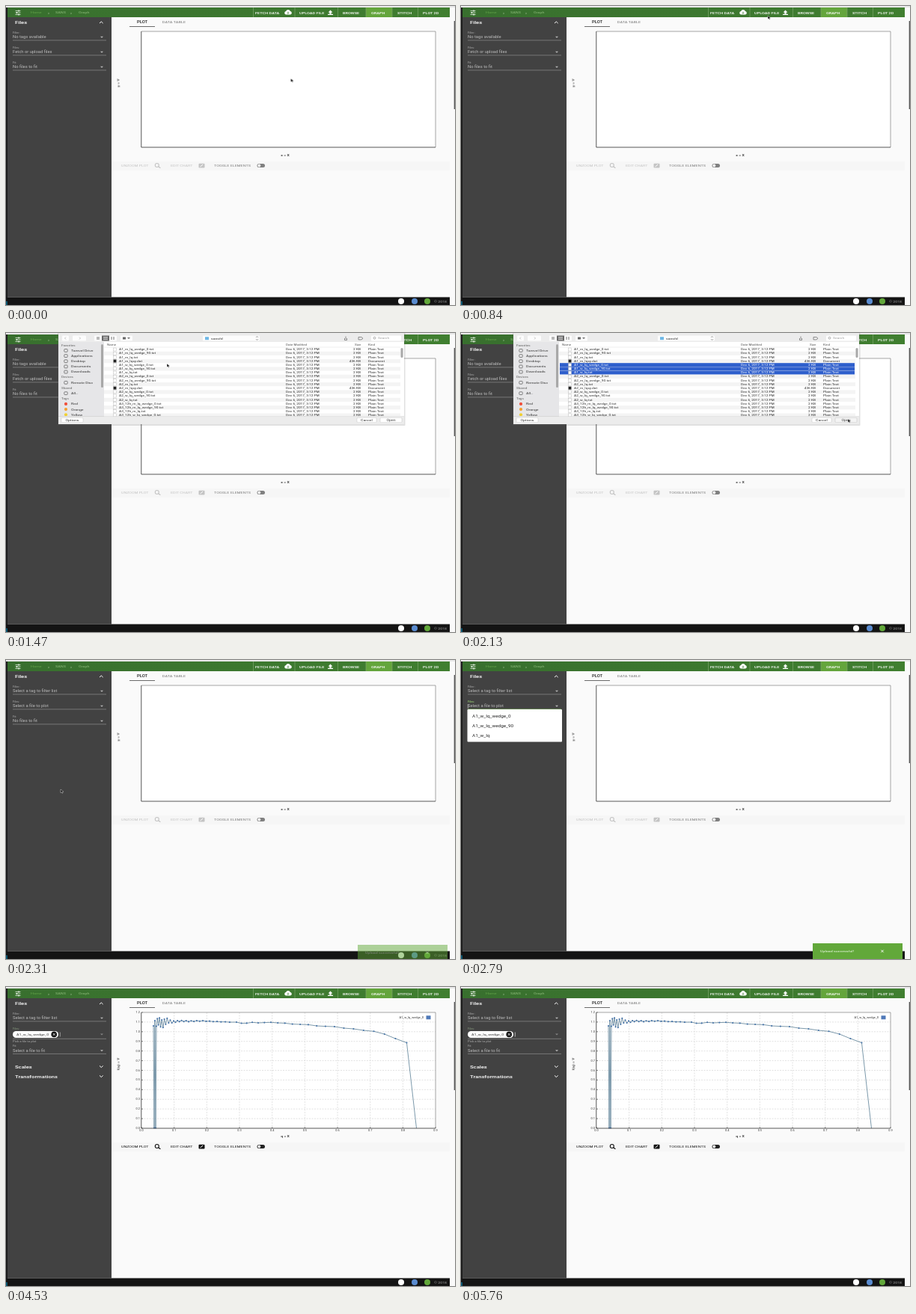
Write an HTML page that moves like this. It is 600 px wide and 400 px high and loops after 5.79 s.

```html
<!DOCTYPE html>
<html lang="en">
<head>
<meta charset="utf-8">
<title>Upload and plot</title>
<style>
html, body { margin: 0; width: 100%; height: 100%; overflow: hidden; background: #fafafa; }
svg { display: block; width: 600px; height: 400px; font-family: Roboto, "Open Sans", sans-serif; }

.empty, .loaded, .idle, .done, .hover, .files, .pick1, .pick3, .press, .focus, .menu, .item {
  animation: 5790ms step-end infinite;
}
.empty { animation-name: empty; }
.loaded { animation-name: loaded; }
.idle { animation-name: idle; }
.done { animation-name: done; }
.hover { animation-name: hover; }
.files { animation-name: files; }
.pick1 { animation-name: pick1; }
.pick3 { animation-name: pick3; }
.press { animation-name: press; }
.focus { animation-name: focus; }
.menu { animation-name: menu; }
.item { animation-name: item; }
.sheet { animation: sheet 5790ms linear infinite; }
.base { animation: base 5790ms linear infinite; }
.toast { animation: toast 5790ms linear infinite; }
.caret { animation: caret 5790ms linear infinite; }
.arrow { animation: move 5790ms ease-in-out infinite, arrow 5790ms step-end infinite; }

@keyframes empty { 0% { opacity: 1 } 38.86%, 100% { opacity: 0 } }
@keyframes loaded { 0% { opacity: 0 } 38.86% { opacity: 1 } 55.96%, 100% { opacity: 0 } }
@keyframes idle { 0% { opacity: 1 } 55.96%, 100% { opacity: 0 } }
@keyframes done { 0% { opacity: 0 } 55.96%, 100% { opacity: 1 } }
@keyframes hover { 0% { opacity: 0 } 7.77% { opacity: .08 } 10.88% { opacity: .18 } 11.4% { opacity: .08 } 14.51%, 100% { opacity: 0 } }
@keyframes files { 0% { opacity: 0 } 21.5%, 100% { opacity: 1 } }
@keyframes pick1 { 0% { opacity: 0 } 25.9%, 100% { opacity: 1 } }
@keyframes pick3 { 0% { opacity: 0 } 29.02%, 100% { opacity: 1 } }
@keyframes press { 0% { opacity: 0 } 35.23%, 100% { opacity: .06 } }
@keyframes focus { 0% { opacity: 0 } 45.6% { opacity: 1 } 55.96%, 100% { opacity: 0 } }
@keyframes menu { 0% { opacity: 0 } 46.11% { opacity: 1 } 55.96%, 100% { opacity: 0 } }
@keyframes item { 0% { opacity: 0 } 50.8%, 100% { opacity: .08 } }
@keyframes sheet {
  0%, 14.51% { transform: translateY(-126px); animation-timing-function: ease-in-out }
  21.5%, 37.13% { transform: none; animation-timing-function: ease-in-out }
  38.86%, 100% { transform: translateY(-126px) }
}
@keyframes base { 0%, 14.51% { opacity: .5 } 19.17% { opacity: .8 } 21.5%, 100% { opacity: 1 } }
@keyframes toast {
  0%, 38.86% { opacity: 0; transform: translateY(4px) }
  40.93%, 55.96% { opacity: 1; transform: none }
  58.55%, 100% { opacity: 0; transform: none }
}
@keyframes caret {
  0%, 66.32% { opacity: 0 }
  68.91%, 71.5% { opacity: 1 }
  74.09%, 76.68% { opacity: 0 }
  79.27%, 81.87% { opacity: 1 }
  84.46%, 87.05% { opacity: 0 }
  89.64%, 92.23% { opacity: 1 }
  94.82%, 97.41% { opacity: 0 }
  100% { opacity: 1 }
}
@keyframes move {
  0%, .52% { transform: translate(380.5px, 97px) }
  8.29%, 21.5% { transform: translate(410px, 13px) }
  25.4%, 26.5% { transform: translate(215px, 41px) }
  28.5%, 29.5% { transform: translate(222px, 52px) }
  34.72%, 37.13% { transform: translate(517px, 115px) }
  39.9%, 41.45% { transform: translate(73px, 173px) }
  45.08%, 49.22% { transform: translate(46px, 60px) }
  52%, 55.96% { transform: translate(48px, 74px) }
  59.59% { transform: translate(60px, 78px) }
  63.73%, 100% { transform: translate(66px, 64px) }
}
@keyframes arrow { 0% { opacity: 1 } 45.6% { opacity: 0 } 49.22% { opacity: 1 } 63.73%, 100% { opacity: 0 } }
</style>
</head>
<body>
<script>
const WIDE = 1.3; // the screen is shown squashed, so all type runs wide
const range = (n, f) => Array.from({ length: n }, (_, i) => f(i)).join('');
const text = (x, y, s, size, fill, extra = '') =>
  `<text transform="translate(${x} ${y + size * .35}) scale(${WIDE} 1)" font-size="${size}" fill="${fill}" ${extra}>${s}</text>`;
const rect = (x, y, w, h, fill, extra = '') =>
  `<rect x="${x}" y="${y}" width="${w}" height="${h}" fill="${fill}" ${extra}/>`;
const line = (d, stroke, w = 1, extra = '') =>
  `<path d="${d}" fill="none" stroke="${stroke}" stroke-width="${w}" ${extra}/>`;
const fill = (d, color) => `<path d="${d}" fill="${color}"/>`;
const dot = (x, y, r, color) => `<circle cx="${x}" cy="${y}" r="${r}" fill="${color}"/>`;
const group = (cls, ...parts) => `<g class="${cls}">${parts.flat().join('')}</g>`;
const mid = 'text-anchor="middle"', bold = 'font-weight="500"';

const down = (x, y, c = '#bdbdbd') => fill(`M${x - 2} ${y - 1}h4l-2 2z`, c);
const chevron = (y, s) => line(`M125 ${y - s}l2.3 ${2 * s}l2.3 ${-2 * s}`, '#fff', 1);

function field(y, label, value, under = y + 4.4) {
  return text(9, y - 6, label, 3, '#adadad') + text(9, y, value, 4.5, '#bdbdbd') +
    line(`M9 ${under}H134`, '#8f8f8f', .7) + down(128, y + .3);
}

function header() {
  const tabs = [[333, 'FETCH DATA'], [392, 'UPLOAD FILE'], [450, 'BROWSE'], [488, 'GRAPH'], [523, 'STITCH'], [557, 'PLOT 2D']];
  return rect(0, 0, 600, 2, '#e8e8e8') + rect(2, 2, 591, 13, 'url(#bar)') +
    line('M12.500 6.500h7M12.500 9h7M12.500 11.500h7', '#e4f0e0', .8) +
    line('M17 5.500v2M14.500 8v2M17 10.500v2', '#fff', 1.1) +
    text(33, 9, 'Home', 4.2, '#65a54b') + text(56, 9, '›', 5, '#c5d8bc') +
    text(66, 9, 'SANS', 4.2, '#8cba7a') + text(86, 9, '›', 5, '#c5d8bc') +
    text(97, 9, 'Graph', 4.2, '#8cba7a') +
    rect(481, 2, 35, 13, '#64a53c') +
    line('M330.500 2v13M386 2v13M443.500 2v13M481 2v13M516 2v13M550.500 2v13', '#7ba56c', .7) +
    rect(386, 2, 57, 13, '#fff', 'class="hover"') +
    tabs.map(([x, s]) => text(x, 9, s, 4.3, '#fff', bold)).join('') +
    fill('M374 11.500a2.300 2.300 0 0 1 0-4.500a3.300 3.300 0 0 1 6 0a2.300 2.300 0 0 1 0 4.500z', '#fff') +
    line('M377 7.500v2.500M375.700 9l1.300 1.300l1.300-1.300', '#3d7a30', .7) +
    fill('M433.500 5.500l3 3h-1.800v2h-2.400v-2h-1.800zM430 10.800h7v1.300h-7z', '#fff');
}

function sidebar() {
  return rect(0, 15, 141, 374.5, '#424242') + rect(0, 0, 2, 400, '#1c1c1c') +
    text(12, 21.5, 'Files', 5.9, '#fff', bold) + chevron(22, -1.1) +
    group('empty', field(41.5, 'Filter:', 'No tags available'),
      field(61.5, 'Files:', 'Fetch or upload files'), field(81.5, 'Fit:', 'No files to fit')) +
    group('loaded', field(41.5, 'Filter:', 'Select a tag to filter list'),
      field(61.5, 'Files:', 'Select a file to plot'), field(81.5, 'Fit:', 'No files to fit')) +
    group('focus', text(9, 55.5, 'Files:', 3, '#66a83c'), line('M9 66H134', '#66a83c', .9),
      line('M9.300 59v6', '#ddd', .6)) +
    group('done', field(41.5, 'Filter:', 'Select a tag to filter list'),
      text(9, 56, 'Files:', 3, '#8a9c80'),
      rect(9, 59, 61, 9, '#fff', 'rx="4.500"'),
      text(14, 63.4, 'A1_w_Iq_wedge_0', 4.1, '#333'),
      dot(64.2, 63.4, 3.8, '#111'), line('M62.700 61.900l3 3m0-3l-3 3', '#fff', .8),
      line('M9 69.300H134', '#8f8f8f', .7), down(128, 63.5, '#888'),
      text(9, 72.4, 'Pick a file to plot', 3.3, '#adadad'),
      field(85, 'Fit:', 'Select a file to fit'),
      text(12, 106.5, 'Scales', 5.9, '#fff', bold), chevron(106.5, 1.1),
      text(12, 119.5, 'Transformations', 5.9, '#fff', bold), chevron(119.5, 1.1)) +
    group('caret', line('M72.300 60.500v6', '#f0f0f0', .8));
}

function menu() {
  const names = ['A1_w_Iq_wedge_0', 'A1_w_Iq_wedge_90', 'A1_w_Iq'];
  return group('menu', rect(8.5, 66, 126.5, 43.5, '#fff', 'rx="1"'),
    rect(8.5, 69, 126.5, 12.5, '#000', 'class="item"'),
    names.map((s, i) => text(15, 75 + 13 * i, s, 4.9, '#222')));
}

// Plot coordinates
const px = q => 181 + 436.7 * q, py = v => 189 - 129.2 * v;

function curve() {
  const pts = [[197, 52], [198, 188.5], [199, 45], [200, 188.5]];
  let x = 201, i = 0;
  while (x < 302) {
    const amp = 5.5 * Math.exp(-((x - 208) ** 2) / 90) + 2.6 * Math.exp((201 - x) / 35);
    const base = 45.5 + 3 * Math.exp((201 - x) / 14) + Math.max(0, x - 265) * .045;
    pts.push([x, base + amp * (i % 2 ? -1 : 1) * (.7 + .3 * Math.sin(i * 2.3))]);
    x += 1.3 + (x - 201) * .05;
    i++;
  }
  const tail = [47, 48.5, 48.4, 47.3, 48, 47.6, 47.3, 48, 48.4, 49.6, 50, 50.4, 52, 52.6, 53, 55, 56, 58, 59.3, 63, 69, 74.5];
  tail.forEach((y, k) => pts.push([308 + 6.4 * k + .211 * k * k, y]));
  return pts;
}

function chart() {
  const pts = curve();
  const grid = range(8, i => `M${px(.1 * (i + 1))} 34V189`) + range(11, i => `M181 ${py(.1 * (i + 1))}H574`);
  return group('done', line(grid, '#d6d6d6', .7, 'stroke-dasharray="2 1.500"'),
    range(10, i => text(px(i / 10), 192.3, (i / 10).toFixed(1), 3, '#333', mid)),
    range(13, i => text(179, py(i / 10), (i / 10).toFixed(1), 3, '#333', 'text-anchor="end"')),
    line(range(10, i => `M${px(i / 10)} 187v2`) + range(13, i => `M181 ${py(i / 10)}h2`), '#444', .6),
    line('M' + pts.join('L') + 'L548.500 189', '#5b7f96', .8),
    pts.map(([x, y]) => dot(x, y, 1.05, '#4673a8')),
    text(558, 41, 'A1_w_Iq_wedge_0', 3.1, '#333', 'text-anchor="end"'),
    rect(561.5, 38.3, 6, 5, '#4f79b8'));
}

const upright = (s, size) =>
  `<text transform="translate(151.500 103) rotate(-90) scale(${WIDE} 1)" font-size="${size}" font-weight="500" fill="#222" ${mid}>${s}</text>`;

function controls(c, c2) {
  return text(154, 213.5, 'UNZOOM PLOT', 4.1, c) + text(220, 213.5, 'EDIT CHART', 4.1, c) +
    `<circle cx="201.800" cy="213" r="2.500" fill="none" stroke="${c}" stroke-width="1.100"/>` +
    line('M203.600 214.800l2.800 2', c, 1.3) + rect(257.5, 210.7, 8, 5.8, c, 'rx="1"') +
    line('M259.500 215l3.700-3', '#fff', 1) + text(278, 213.5, 'TOGGLE ELEMENTS', 4.2, c2) +
    rect(335.5, 211, 10.5, 5, c2, 'rx="2.500"') + dot(338.3, 213.5, 1.9, '#fafafa');
}

function stage() {
  return rect(181, 34, 393, 155, '#fff') +
    text(182, 21.5, 'PLOT', 4.5, '#222', mid + ' ' + bold) + line('M165 27.500H199', '#5c5c5c', .9) +
    text(224.5, 21.5, 'DATA TABLE', 4.3, '#777', mid) +
    rect(141, 208, 452, 12, '#f6f6f6') +
    group('idle', upright('y = Y', 4), text(373, 199.5, 'x = X', 4, '#222', mid + ' ' + bold), controls('#c4c4c4', '#808080')) +
    chart() +
    group('done', upright('I(q) = Y', 4), text(373, 199.5, 'q = X', 4, '#222', mid + ' ' + bold), controls('#111', '#222')) +
    line('M180.800 34H574V189', '#808080', .7) + line('M180.800 34V189H574', '#444', .9);
}

function footer() {
  return rect(0, 389.5, 593, 10.5, '#141414') + rect(0, 395, 2, 5, '#0a5570') +
    dot(528, 395, 4, '#fff') + dot(546, 395, 4, '#5a8cd0') + dot(563, 395, 4, '#62a83a') +
    text(572, 395.3, '© 2018', 4, '#a0a0a0') +
    rect(593, 0, 7, 400, '#fafafa') + rect(598.7, 20, 1.3, 118, '#555');
}

const toast = () => group('toast', rect(470, 379, 120, 22, '#62a83a'),
  text(480, 389.5, 'Upload successful!', 4.1, '#f4fff0'), line('M561.300 387.800l3.400 3.400m0-3.400l-3.400 3.400', '#fff', .9));

function fileRows() {
  const kinds = ['_wedge_0.txt', '_wedge_90.txt', '.txt', 'xy.dat'];
  const names = [];
  for (const set of ['A1_m', 'A1_w', 'A2_m', 'A2_w', 'A3_12h_m', 'A3_12h_w'])
    kinds.slice(0, /A[12]_m/.test(set) ? 4 : 3).forEach(k => names.push(`${set}_Iq${k}`));
  const row = (i, c) => {
    const y = 22 + 5.17 * i, dat = names[i].endsWith('dat');
    return rect(143.5, y - 2, 4, 4, dat ? '#222' : '#fff', 'stroke="#aaa" stroke-width=".4"') +
      text(151, y, names[i], 3.7, c) + text(374, y, 'Dec 6, 2017, 3:12 PM', 3.7, c) +
      text(474, y, dat ? '436 KB' : '2 KB', 3.7, c, 'text-anchor="end"') +
      text(484, y, dat ? 'Document' : 'Plain Text', 3.7, c);
  };
  const picked = i => rect(132, 19.5 + 5.17 * i, 394, 4.9, '#2f5fcc') + row(i, '#fff');
  return range(18, i => row(i, '#2d2d2d')) + group('pick1', picked(4)) + group('pick3', picked(5), picked(6));
}

function places() {
  const heads = ['Favorites', 'Devices', 'Shared', 'Tags'];
  const names = ['Favorites', 'Tamvel Drive', 'Applications', 'Desktop', 'Documents', 'Downloads', 'Devices',
    'Remote Disc', 'Shared', 'All…', 'Tags', 'Red', 'Orange', 'Yellow'];
  const tags = ['#f0503c', '#f5a02f', '#f0d030'];
  return names.map((s, i) => {
    const y = 16.3 + 7.15 * i;
    if (heads.includes(s)) return text(74, y, s, 3.5, '#777', bold);
    const icon = i > 10 ? dot(80, y, 2.1, tags[i - 11])
      : rect(77.8, y - 1.9, 4.4, 3.8, 'none', 'stroke="#666" stroke-width=".8" rx=".8"');
    return icon + text(87, y, s, 4, '#333');
  }).join('');
}

function button(x, w, s, extra = '') {
  return rect(x, 113.3, w, 6.4, '#fff', 'stroke="#c8c8c8" stroke-width=".5" rx="1.500"') + extra +
    text(x + w / 2, 116.5, s, 4, '#333', mid);
}

function sheet() {
  return group('sheet', rect(69, -4, 464.5, 128, '#666', 'opacity=".2" rx="1"'),
    rect(70, -2, 462, 113.6, '#ececec'), rect(70, 12, 61, 99.6, '#e6e6e8'), rect(131, 12, 401, 99.6, '#fff'),
    range(9, i => rect(131, 24.7 + 10.34 * i, 396, 5.17, '#f4f4f4')),
    rect(75, 3.5, 9, 7, '#fcfcfc', 'rx="1"'), rect(89, 3.5, 18, 7, '#fcfcfc', 'rx="1"'),
    line('M80 5.500l-1.500 1.500l1.500 1.500M98 5.500l1.500 1.500l-1.500 1.500', '#aaa', .7),
    rect(118, 3.5, 30, 7, '#fcfcfc', 'rx="1"'), rect(128, 3.5, 10, 7, '#666'),
    line('M121 6h4M121 8h4M141 5v4M144 5v4', '#666', .9), line('M130 5.500h6M130 7h6M130 8.500h6', '#fff', .6),
    rect(153, 3.5, 16, 7, '#fcfcfc', 'rx="1"'), rect(156, 5.5, 4, 3, '#666'), down(164, 7, '#666'),
    rect(263, 3.5, 76, 7, '#fcfcfc', 'rx="1"'), rect(266, 5.2, 5, 4, '#6fb8e6'),
    text(274, 7.1, 'sansfd', 4, '#333'), line('M334 6l1.500-1.500L337 6M334 8l1.500 1.500L337 8', '#666', .6),
    line('M452.500 7v2.500h3V7M454 8V4.500M471 5.500h4l2 1.700l-2 1.700h-4z', '#666', .7),
    rect(488, 3.5, 40, 7, '#fff', 'rx="1"'), text(497, 7.1, 'Search', 3.8, '#a0a0a0'),
    `<circle cx="492.500" cy="6.700" r="1.400" fill="none" stroke="#777" stroke-width=".6"/>`,
    group('files', places(), rect(127, 15, 3, 58, '#a8a8a8', 'rx="1.500"'),
      text(135, 16, 'Name', 3.5, '#555'), text(374, 16, 'Date Modified', 3.5, '#555'),
      text(466, 16, 'Size', 3.5, '#555'), text(484, 16, 'Kind', 3.5, '#555'),
      line('M131 19H527', '#dcdcdc', .5), fileRows(), rect(527.5, 20, 3, 13, '#a8a8a8', 'rx="1.500"')),
    group('base', rect(70, 111.6, 462, 10.4, '#ececec'), line('M70 111.600H532', '#d5d5d5', .5),
      group('files', button(74, 29, 'Options'), button(469, 26, 'Cancel'),
        button(500, 29, 'Open', rect(500, 113.3, 29, 6.4, '#000', 'class="press" rx="1.500"'))),
      `<g opacity=".35">${button(74, 29, 'Options')}${button(469, 26, 'Cancel')}${button(500, 29, 'Open')}</g>`));
}

const arrow = () => group('arrow',
  '<path d="M0 0v4.600l1.200-.9l.9 1.600l.9-.4l-.8-1.500l1.700-.2z" fill="#111" stroke="#fff" stroke-width=".4"/>');

document.body.innerHTML = `<svg viewBox="0 0 600 400">
  <defs><linearGradient id="bar"><stop stop-color="#386f2e"/><stop offset="1" stop-color="#407f30"/></linearGradient></defs>
  ${rect(0, 0, 600, 400, '#fafafa')}${stage()}${sidebar()}${footer()}${header()}${menu()}${toast()}${sheet()}${arrow()}
</svg>`;
</script>
</body>
</html>
```
